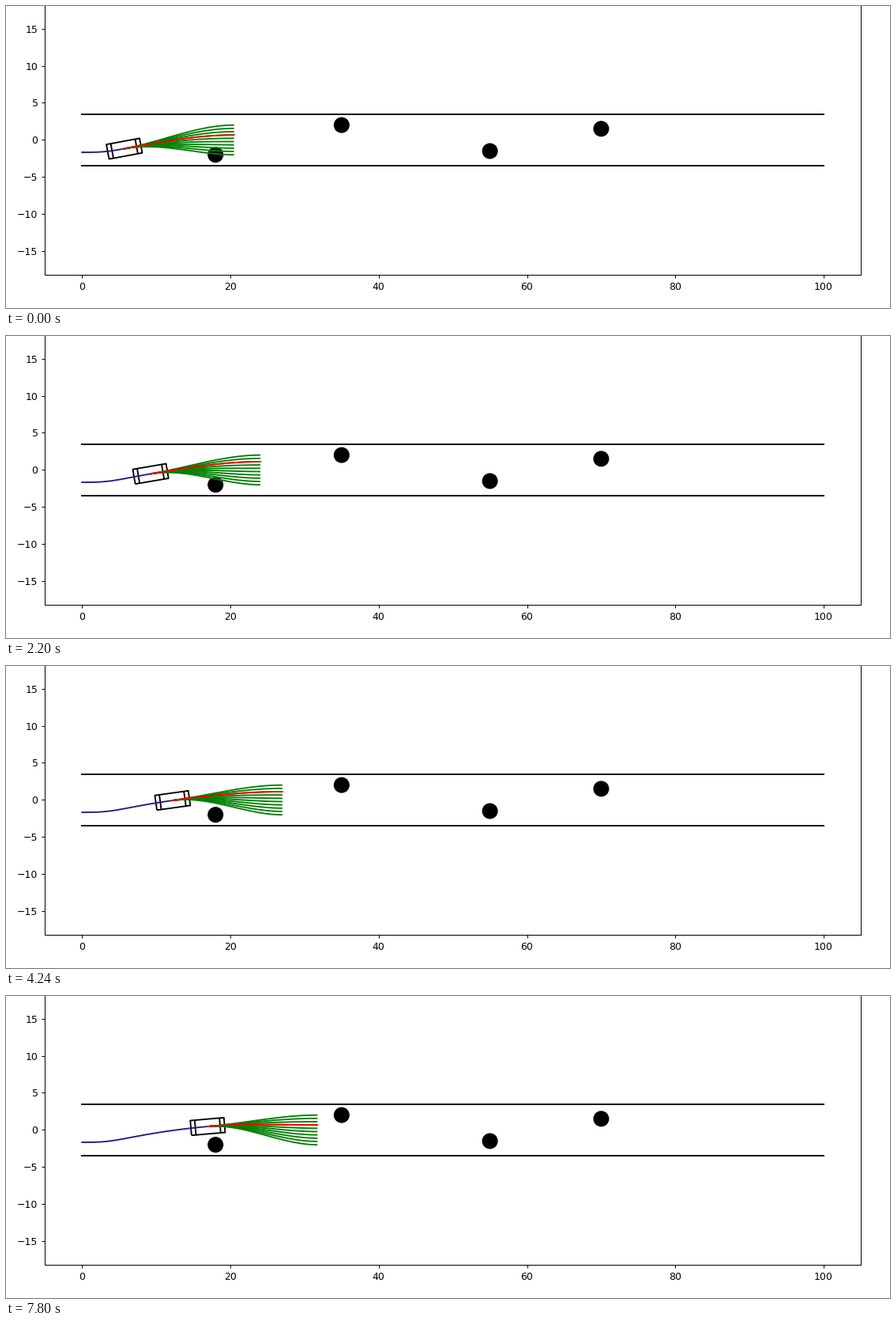
A matplotlib script for the animation above (8 s loop, 1119 px wide and 382 px high).

```python
import numpy as np
import matplotlib.pyplot as plt
from matplotlib.animation import FuncAnimation
from matplotlib.collections import LineCollection

W, H, DPI = 1119, 382, 100
LOOP, INTERVAL = 8000, 20

# Axes box in pixels; it runs on past the top of the stage.
LEFT, BOTTOM, WIDTH, HEIGHT = 49.3, 42, 1032.7, 400
SCALE = WIDTH / 110
Y_MIN = -(H - BOTTOM - 169.4) / SCALE
LINE = 1.35

START_X, STEP, HORIZON = 5.7, 0.592, 14.8
CAR_LEN, CAR_WID, BUMPER = 4.55, 2.0, 0.6
OBSTACLES = [(18, -2), (35, 2), (55, -1.5), (70, 1.5)]
OFFSETS = np.linspace(2, -2, 10)

# The planner ticks a little slower with every step.
tick = np.arange(19)
step_times = 50 + 400 * tick + 1.6 * tick**2

# Driven route: the heading swings left, then slowly straightens.
road_x = np.linspace(0, 18, 361)
slope = (0.27 - 0.0108 * road_x) * (1 - np.exp(-(road_x / 4.1)**2.4))
rise = (slope[1:] + slope[:-1]) / 2 * np.diff(road_x)
road_y = -1.667 + np.concatenate([[0], np.cumsum(rise)])


def pose(step):
    x = START_X + STEP * step
    return x, np.interp(x, road_x, road_y), np.interp(x, road_x, slope)


def candidate(x, y, dy, target):
    """Cubic from the car's pose to a level finish at the target offset."""
    s = np.linspace(0, 1, 40)
    blend = s**2 * (3 - 2 * s)
    lead = s * (1 - s)**2
    return np.column_stack([x + HORIZON * s,
                            y + (target - y) * blend + dy * HORIZON * lead])


def car_lines(x, y, dy):
    a, b = CAR_LEN / 2, CAR_WID / 2
    c = a - BUMPER
    yaw = np.arctan(dy)
    rot = np.array([[np.cos(yaw), np.sin(yaw)], [-np.sin(yaw), np.cos(yaw)]])
    shapes = [[(-a, -b), (a, -b), (a, b), (-a, b), (-a, -b)],
              [(-c, -b), (-c, b)],
              [(c, -b), (c, b)]]
    return [np.array(p) @ rot + (x, y) for p in shapes]


plt.rcParams.update({"lines.linewidth": LINE, "axes.linewidth": 0.72})
fig = plt.figure(figsize=(W / DPI, H / DPI), dpi=DPI, facecolor="white")
ax = fig.add_axes([LEFT / W, BOTTOM / H, WIDTH / W, HEIGHT / H])
ax.set_xlim(-5, 105)
ax.set_ylim(Y_MIN, Y_MIN + HEIGHT / SCALE)
ax.set_xticks(range(0, 101, 20))
ax.set_yticks(range(-15, 16, 5))
ax.tick_params(labelsize=9, length=3.15, pad=3.15, width=0.72)

for side in (-3.5, 3.5):
    ax.plot([0, 100], [side, side], color="black")
for spot in OBSTACLES:
    ax.add_patch(plt.Circle(spot, 1, color="black", lw=0.9))

car = ax.add_collection(LineCollection([], colors="black", linewidths=LINE, zorder=3))
trail, = ax.plot([], [], color="#1c1c90", zorder=4)
fan = ax.add_collection(LineCollection([], colors="green", linewidths=LINE, zorder=5))
best, = ax.plot([], [], color="red", zorder=6)


def draw(frame):
    now = frame * INTERVAL + INTERVAL / 2
    step = int(np.searchsorted(step_times, now, side="right"))
    x, y, dy = pose(step)
    paths = [candidate(x, y, dy, t) for t in OFFSETS]
    choice = 2 if 1 <= step <= 15 else 3

    car.set_segments(car_lines(x, y, dy))
    driven = road_x < x
    trail.set_data(np.append(road_x[driven], x), np.append(road_y[driven], y))
    fan.set_segments(paths)
    best.set_data(paths[choice].T)
    return car, trail, fan, best


anim = FuncAnimation(fig, draw, frames=LOOP // INTERVAL, interval=INTERVAL,
                     repeat=True, repeat_delay=0)
plt.show()
```
